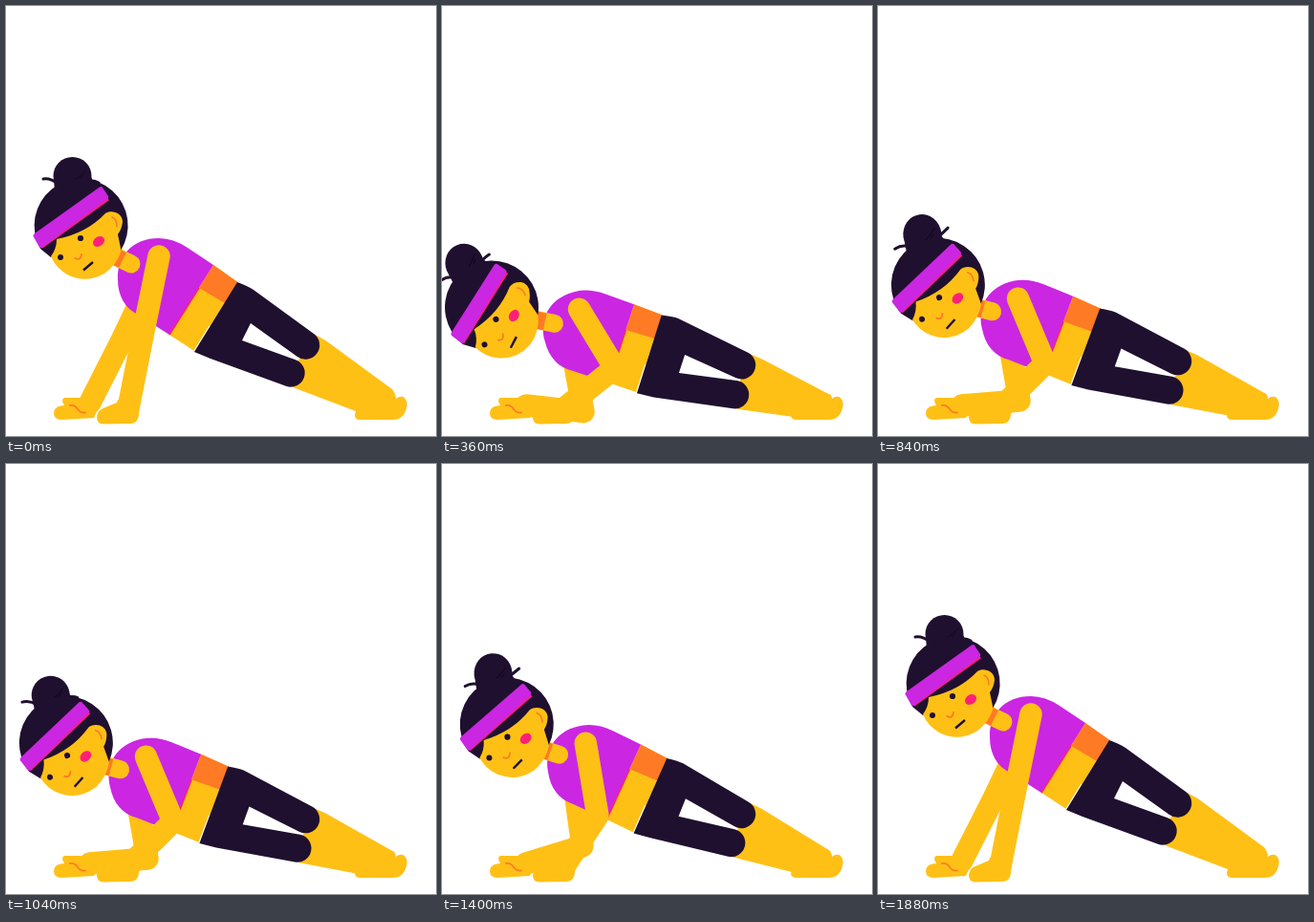
Animation, 450 px wide and 450 px high, one loop 1920 ms. Source, as an HTML page with a canvas:

```html
<!DOCTYPE html>
<html lang="en">
<head>
<meta charset="utf-8">
<title>Push-ups</title>
<style>
html, body { margin: 0; width: 100%; height: 100%; overflow: hidden; background: #fff; }
canvas { display: block; width: 450px; height: 450px; }
</style>
</head>
<body>
<canvas id="stage" width="450" height="450"></canvas>
<script>
const ctx = document.getElementById('stage').getContext('2d');
const SKIN = '#ffc016', DARK = '#20102f', TOP = '#cb26e2', ORANGE = '#ff7a24', PINK = '#ff2079';
const LOOP = 1920, STEP = 40, REP = 1880 / 3, DEPTH = 1.11;
const RAD = Math.PI / 180;

// Elbow positions by depth: [depth, front x, y, back x, y]
const ELBOWS = [
  [0, 144, 340, 121, 350],
  [0.19, 143, 348, 137, 380],
  [0.52, 163, 368, 147, 400],
  [0.757, 175, 374, 148, 413],
  [0.95, 181, 379, 148, 425],
  [1.12, 186, 384, 148, 427]
];

function elbows(u) {
  let i = 1;
  while (i < ELBOWS.length - 1 && u > ELBOWS[i][0]) i++;
  const a = ELBOWS[i - 1], b = ELBOWS[i];
  const k = (u - a[0]) / (b[0] - a[0]);
  const p = a.map((v, j) => v + (b[j] - v) * k);
  return { front: [p[1], p[2]], back: [p[3], p[4]] };
}

function fill(d, color) {
  ctx.fillStyle = color;
  ctx.fill(new Path2D(d));
}

function line(d, color, width, cap = 'round') {
  ctx.strokeStyle = color;
  ctx.lineWidth = width;
  ctx.lineCap = cap;
  ctx.lineJoin = 'round';
  ctx.stroke(new Path2D(d));
}

function oval(x, y, rx, ry, color, turn = 0) {
  ctx.fillStyle = color;
  ctx.beginPath();
  ctx.ellipse(x, y, rx, ry, turn * RAD, 0, 2 * Math.PI);
  ctx.fill();
}

const limb = (pts, width) => line('M' + pts.map(p => p.join()).join('L'), SKIN, width);

// Draw in rest-pose coordinates, turned about a pivot that has moved to pos
function posed(pivot, pos, deg, draw) {
  ctx.save();
  ctx.translate(pos[0], pos[1]);
  ctx.rotate(deg * RAD);
  ctx.translate(-pivot[0], -pivot[1]);
  draw();
  ctx.restore();
}

function place(p, pivot, pos, deg) {
  const c = Math.cos(deg * RAD), s = Math.sin(deg * RAD);
  const x = p[0] - pivot[0], y = p[1] - pivot[1];
  return [pos[0] + x * c - y * s, pos[1] + x * s + y * c];
}

function knee(k, r, a, b) {
  const dir = Math.atan2(k[1] - (a[1] + b[1]) / 2, k[0] - (a[0] + b[0]) / 2);
  ctx.arc(k[0], k[1], r, dir - Math.PI / 2, dir + Math.PI / 2);
}

function legs(u, hip, seat) {
  const k1 = [313.5, 355 + 22 * u], k2 = [298 + 9 * u, 384 + 24 * u];
  fill(`M${k1[0] + 9},${k1[1] - 11.5} L${k1[0] + 21},${k1[1] - 5 - 1.5 * u} L404,${401 + 5 * u} Q408,406 408,411
    Q413,407 417,410 Q421,414 419,421 Q416,433 405,433 L371,433 Q365,433 365,428 L366,${424 + 6 * u}
    L${k2[0] + 2},${k2[1] + 15} L${k2[0]},${k2[1]} Z`, SKIN);

  const t1 = [hip[0] + 17, hip[1] + 8 - 5 * u];
  const g1 = [256 - 2 * u, 332 + 35 * u], g2 = [247 + u, 350 + 36 * u];
  const b1 = [214 + 8 * u, 369 + 43 * u];
  ctx.fillStyle = DARK;
  ctx.beginPath();
  ctx.moveTo(...hip);
  ctx.quadraticCurveTo(hip[0] + 11, hip[1] + 4 - 3 * u, ...t1);
  knee(k1, 14.7, t1, g1);
  ctx.lineTo(...g1);
  ctx.lineTo(...g2);
  knee(k2, 14.7, g2, b1);
  ctx.lineTo(...b1);
  ctx.lineTo(...seat);
  ctx.fill();
}

function torso() {
  fill('M217,271 L242.5,289 L197,361 L171,344 Z', SKIN);
  fill('M217,271 L242.5,289 L229,311 L202,295 Z', ORANGE);
  fill('M217,271 L190,253 Q175,243 160,243 C132,243 116,262 117,286 C117,303 124,316 138,323 L171,344 Z', TOP);
  line('M202,295 L171,344', PINK, 1.6, 'butt');
  line('M213,335 L197,361', '#fff', 1.3, 'butt');
  line('M104,257 L131,270', SKIN, 19);
  line('M112,261 L122,266', ORANGE, 18, 'butt');
}

function head(lift) {
  const rise = lift * 0.2;
  oval(69.5, 178 - rise, 20, 20 + rise / 2, DARK);
  fill('M50,181 L89,179 L95,190 L51,195 Z', DARK);
  line(`M39,${181 + lift * 0.4} Q47,${180 + rise} 54,186 M97,${185 - lift} Q91,${181 - lift / 3} 80,184`, DARK, 3);
  line(`M62,187 Q72,184 83,${173 - rise} M70,188 Q76,184 81,177`, '#12051d', 1);

  // Hair cap, then the face with its own outline down to the chin
  fill('M47,263 L36,254 A49,49 0 1 1 120,256 L80,262 Z', DARK);
  fill(`M47,262 Q53,254 53,244 Q84,238 104,217 C110,213 122,216 122,226 Q121,234 117,239
    L120.5,256 Q116,271 103,280 Q83,291 64,281 Q52,274 47,262 Z`, SKIN);
  line('M37,252.5 L107,202', PINK, 3, 'butt');
  fill('M30,238 L98,189.5 Q100,188.5 101,190 L107,199 Q108,201 106,202 L38,252.5 Q36,254 35,252.5 L28.5,241 Q28,239.5 30,238 Z', TOP);

  oval(57, 263, 3, 3, DARK);
  oval(78, 243, 3.1, 3.1, DARK);
  oval(97, 246.5, 6.5, 5, PINK, -35);
  line('M72,264 Q78,267 79,260', ORANGE, 1.8);
  line('M111,221 Q116,223 116,231', ORANGE, 1.6);
  line('M81,276.5 L91,268', DARK, 2.4, 'butt');
}

function backHand() {
  fill(`M61,410 L84,410 L98,418 L92,431 L58,433 Q50,433 50,426 Q50,420 57,418.5
    L61,418 Q57,412 61,410 Z`, SKIN);
}

function frontHand() {
  fill(`M117,412 L140,413 L139,428 Q138,437 130,437 L102,437.5 Q95,437 95,430.5
    Q96,422 104,420 L116,415 Z`, SKIN);
}

function draw(t) {
  const cycle = t / REP, p = cycle % 1;
  const u = DEPTH * (1 - Math.abs(1 - 2 * p));
  const nod = cycle < 1 ? u / 0.95 : 0;
  const lift = p < 0.66 ? 13 * Math.pow(Math.sin(Math.PI * p / 0.66), 0.6) : 0;

  const rest = [242, 289], hip = [242 - 13 * u, 289 + 36.5 * u], lean = -15 * u;
  const onTorso = q => place(q, rest, hip, lean);
  const arm = elbows(u);

  ctx.fillStyle = '#fff';
  ctx.fillRect(0, 0, 450, 450);

  limb([onTorso([142, 306]), arm.back, [88, 418 - 3 * Math.max(0, 1 - 4 * u)]], 23.5);
  backHand();
  line('M67,418 Q72,417 75,422 Q78,426 83,425.5', ORANGE, 1.8);

  posed(rest, hip, lean, torso);
  legs(u, hip, onTorso([197, 362]));

  const face = [79 - 19.5 * u - 5.5 * nod, 237 + 82 * u + 7.5 * nod];
  posed([79, 237], face, -10.5 * u - 12.3 * nod, () => head(lift));

  limb([onTorso([160, 262]), arm.front, [128, 421]], 23.5);
  frontHand();
}

function tick(now) {
  draw(Math.floor((now % LOOP) / STEP) * STEP);
  requestAnimationFrame(tick);
}

draw(0);
requestAnimationFrame(tick);
</script>
</body>
</html>
```
